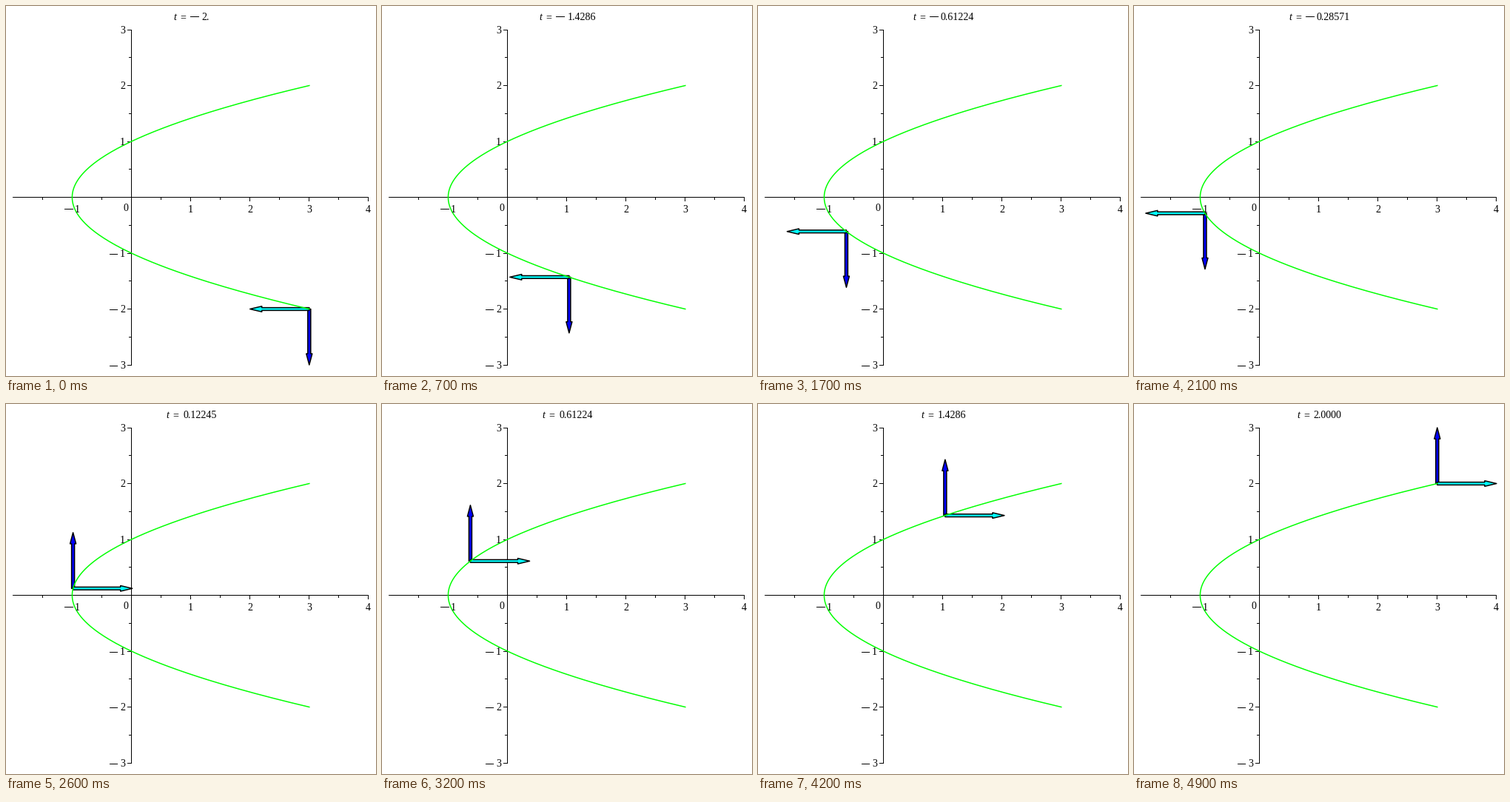
These frames come from a looping animation (500 by 500 pixels, 5000 ms). A matplotlib script:

```python
import matplotlib.pyplot as plt
import numpy as np
from matplotlib.animation import FuncAnimation
from matplotlib.patches import Polygon, Rectangle

SIZE, DPI = 500, 100
FRAMES, INTERVAL = 50, 100
PX = 72 / DPI  # points per pixel
FONT = 14 * PX

plt.rcParams["font.family"] = "Liberation Serif"
fig = plt.figure(figsize=(SIZE / DPI, SIZE / DPI), dpi=DPI, facecolor="white")
ax = fig.add_axes([0, 0, 1, 1])
ax.set_xlim(0, SIZE)
ax.set_ylim(SIZE, 0)
ax.axis("off")


def to_px(x, y):
    return 169.5 + 80.1 * np.asarray(x), 258.5 - 75.5 * np.asarray(y)


def bar(x, y, w, h):
    return ax.add_patch(Rectangle((x, y), w, h, fc="black", lw=0, zorder=1))


def label(x, y, s, ha="left", **style):
    return ax.text(x, y, s, size=FONT, ha=ha, va="baseline", zorder=5, **style)


def draw_axes():
    bar(9, 258, 481, 1)
    bar(169, 32, 1, 454)
    for half in range(-3, 9):
        if half == 0:
            continue
        major = half % 2 == 0
        px = int(to_px(half / 2, 0)[0])
        bar(px, 258, 1, 6 if major else 4)
        if major:
            negative = half < 0
            label(px + (7 if negative else 0.5), 279, str(abs(half) // 2), "center")
            if negative:
                bar(px - 10, 274, 12, 1)
    for half in range(-6, 7):
        if half == 0:
            continue
        major = half % 2 == 0
        py = int(to_px(0, half / 2)[1])
        length = 5 if major else 3
        bar(169 - length, py, length, 1)
        if major:
            label(154, py + 5, str(abs(half) // 2))
            if half < 0:
                bar(140, py + 1, 11, 1)
    label(161.5, 277, "0", "center")


def make_arrow(color, zorder):
    arrow = Polygon(np.zeros((7, 2)), closed=True, fc=color, ec="black",
                    lw=1.5 * PX, joinstyle="round", zorder=zorder)
    return ax.add_patch(arrow)


def place_arrow(arrow, x, y, dx, dy):
    along = np.array([0, 0.8, 0.8, 1, 0.8, 0.8, 0])
    across = np.array([1, 1, 2, 0, -2, -1, -1]) * 0.025
    arrow.set_xy(np.column_stack(to_px(x + along * dx - across * dy,
                                       y + along * dy + across * dx)))


draw_axes()
s = np.linspace(-2, 2, 200)
ax.plot(*to_px(s**2 - 1, s), color="#00ff00", lw=1.5 * PX, zorder=4)
vertical = make_arrow("#0000ff", 2)
horizontal = make_arrow("#00ffff", 3)

name = label(0, 19, "t", style="italic")
equals = label(0, 19, "=", "center")
minus = bar(0, 14, 12, 1)
number = label(0, 19, "")


def update(frame):
    t = -2 + 4 * frame / (FRAMES - 1)
    x, y = t * t - 1, t
    sign = 1 if t > 0 else -1
    place_arrow(vertical, x, y, 0, sign)
    place_arrow(horizontal, x, y, sign, 0)

    digits = "2." if frame == 0 else f"{abs(t):#.5g}"
    prefix = 22.5 + (15 if t < 0 else 0)
    width = prefix + 7 * len(digits) - 3.5
    left = 250.75 - width / 2
    name.set_x(left)
    equals.set_x(left + 12.8)
    minus.set_x(round(left + 22.5))
    minus.set_visible(t < 0)
    number.set_x(left + prefix)
    number.set_text(digits)
    return vertical, horizontal, name, equals, minus, number


anim = FuncAnimation(fig, update, frames=FRAMES, interval=INTERVAL,
                     repeat=True, repeat_delay=0, blit=False)
plt.show()
```
